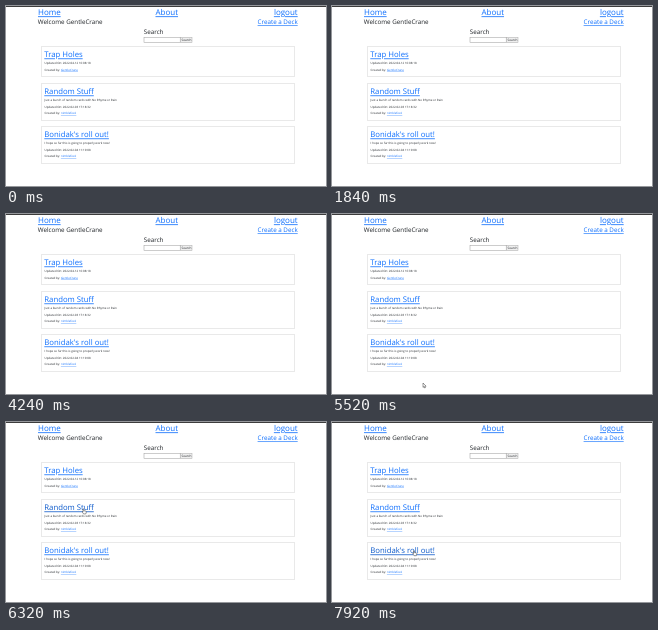
An HTML page for the animation above (8 s loop, 320 px wide and 180 px high).

```html
<!DOCTYPE html>
<html lang="en">
<head>
<meta charset="utf-8">
<title>Decks</title>
<style>
  html, body { margin: 0; width: 100%; height: 100%; overflow: hidden; background: #fff; }
  svg { display: block; width: 100vw; height: 100vh; }
  text { font-family: "Open Sans", "Noto Sans", sans-serif; fill: #212529; text-rendering: geometricPrecision; }
  .link { fill: #0d6efd; text-decoration: underline; }
  .hover { fill: #0a58ca; }
  .nav { font-size: 8px; }
  .title { font-size: 7.75px; }
  .sub { font-size: 6.25px; }
  .small { font-size: 2.95px; }
  .end { text-anchor: end; }
  .box { fill: none; stroke: #e9e9e9; }
</style>
</head>
<body>
<svg id="stage" viewBox="0 0 320 180">
  <rect width="320" height="1" fill="#3c3c3c"/>
  <text class="nav link" x="32" y="9.3">Home</text>
  <text class="nav link" x="149.5" y="9.3">About</text>
  <text class="nav link end" x="291.7" y="9.3">logout</text>
  <text class="sub" x="31.8" y="18.4">Welcome GentleCrane</text>
  <text class="sub link end" x="291.7" y="18.4">Create a Deck</text>
  <text class="sub" x="137.8" y="28.3">Search</text>
  <rect x="138" y="31.3" width="36.2" height="5.4" fill="#fff" stroke="#999" stroke-width=".5"/>
  <rect x="174.5" y="31.3" width="11.5" height="5.4" fill="#efefef" stroke="#aaa" stroke-width=".5"/>
  <text x="175.6" y="35.2" font-size="3.1">Search</text>
  <g id="decks"></g>
  <g id="cursor" fill="#fff" stroke="#222" stroke-width=".45" stroke-linejoin="round">
    <path id="arrow" d="M0 0V4.4L1 3.5 1.7 5 2.4 4.7 1.8 3.2H3.1Z"/>
    <path id="hand" d="M-.4 .3Q0-.3 .4 .3V2L2.4 2.4Q2.9 2.6 2.8 3.4L2.3 5.2H.1L-1.3 3.2Q-1.2 2.5-.4 3Z"/>
  </g>
</svg>
<script>
const $ = id => document.getElementById(id);
const LOOP = 8000, STEP = 80;

// Box top, height, title, description, date, owner
const decks = [
  [40.5, 30, "Trap Holes", "", "2022-04-12 16:08:18", "GentleCrane"],
  [77.5, 37, "Random Stuff", "Just a bunch of random cards with No Rhyme or Rain", "2022-02-03 17:18:32", "nimblefox2"],
  [120.5, 37, "Bonidak's roll out!", "I hope so far this is going to properly work now!", "2022-02-04 11:19:08", "nimblefox2"]
];

$("decks").innerHTML = decks.map(([top, height, title, note, date, owner]) => {
  let y = top + 11.2;
  const row = html => `<text class="small" x="38.6" y="${y += 6.5}">${html}</text>`;
  return `<rect class="box" x="35.5" y="${top}" width="253" height="${height}"/>
    <text class="title link" x="38.3" y="${top + 10.9}">${title}</text>` +
    (note ? row(note) : "") + row("Updated On: " + date) +
    row(`Created by: <tspan class="link">${owner}</tspan>`);
}).join("");

const titles = [...document.querySelectorAll(".title")];
const areas = titles.map(el => el.getBBox());

// Pointer stops: time, x, y
const path = [
  [5360, 6, 174], [5520, 91, 169], [5840, 86, 124], [6160, 77.5, 86],
  [6400, 77.5, 87], [6880, 79, 122], [7040, 80, 128.5],
  [7280, 83, 130.5], [7520, 82, 128.5], [LOOP, 82, 128.5]
];

function pointer(t) {
  const i = path.findIndex(p => p[0] > t);
  if (i < 1) return null;
  const [t0, x0, y0] = path[i - 1], [t1, x1, y1] = path[i];
  const k = (t - t0) / (t1 - t0), e = k * k * (3 - 2 * k);
  return { x: x0 + (x1 - x0) * e, y: y0 + (y1 - y0) * e };
}

function draw(now) {
  const t = Math.floor(now % LOOP / STEP) * STEP;
  const p = pointer(t);
  const over = areas.findIndex(b => p && p.x > b.x && p.x < b.x + b.width && p.y > b.y + 1 && p.y < b.y + b.height);
  titles.forEach((el, i) => el.classList.toggle("hover", i === over));
  $("cursor").style.display = p ? "" : "none";
  if (p) $("cursor").setAttribute("transform", `translate(${p.x} ${p.y})`);
  $("arrow").style.display = over < 0 ? "" : "none";
  $("hand").style.display = over < 0 ? "none" : "";
}

const start = performance.now();
function tick() {
  draw(performance.now() - start);
  requestAnimationFrame(tick);
}
tick();
</script>
</body>
</html>
```
